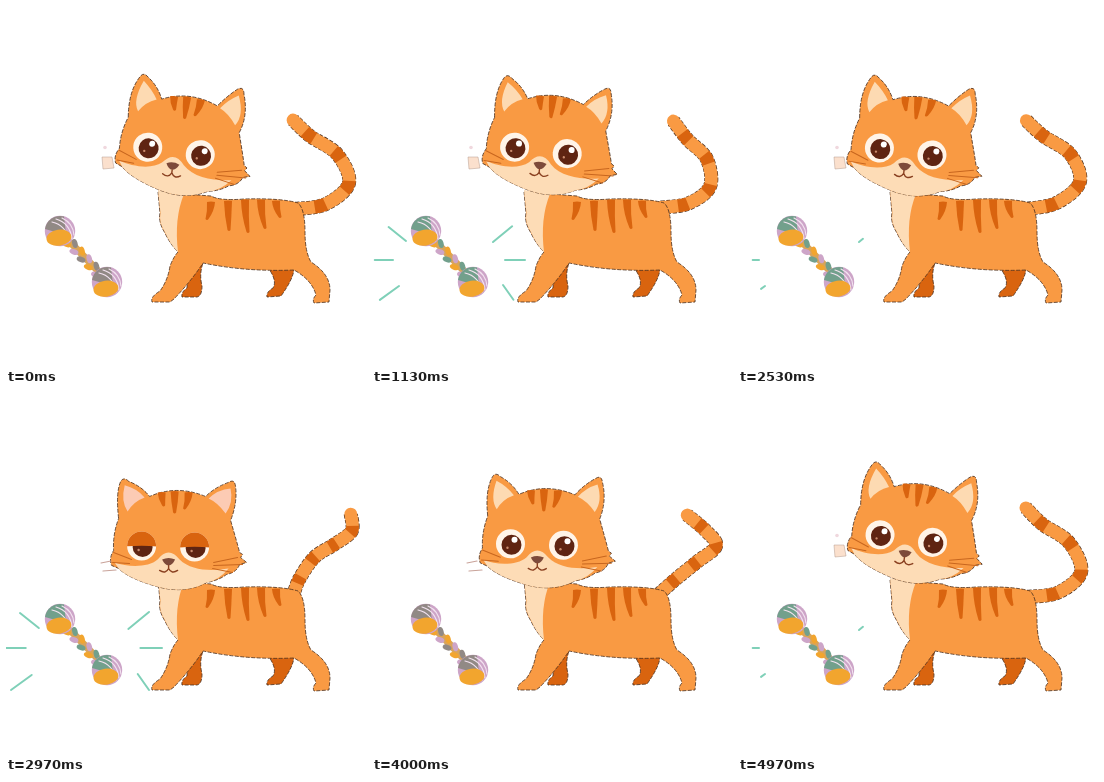
An HTML page for the animation above (5000 ms loop, 360 by 360 pixels).

```html
<!DOCTYPE html>
<html lang="en">
<head>
<meta charset="utf-8">
<title>Cat and rope toy</title>
<style>
  html, body { margin: 0; width: 100%; height: 100%; overflow: hidden; background: #fff; }
  svg { display: block; width: 100vw; height: 100vh; }
  .fur { fill: #f99a43; }
  .dark { fill: #d9640f; }
  .cream { fill: #fddcb6; }
  .edge { stroke: #4a2f1f; stroke-width: .8; stroke-dasharray: 4 1.5; }
  .line { fill: none; stroke-linecap: round; stroke-linejoin: round; }
  .whisker { stroke: #c8661e; stroke-width: 1; }
</style>
</head>
<body>
<svg viewBox="0 0 360 360">
  <defs>
    <clipPath id="eyeClip"><circle r="14.5"/></clipPath>
    <g id="eye">
      <circle r="14.5" fill="#fff4e8"/>
      <circle cx="1" cy="1" r="10" fill="#5f2412"/>
      <circle cx="4" cy="-4" r="3" fill="#fff"/>
      <circle cx="-3" cy="4" r="1.2" fill="#c98a6c"/>
    </g>
    <g id="ball">
      <circle r="15.2" fill="#cda5c8"/>
      <path class="strand" d="M-15 -2 A15.2 15.2 0 0 1 4 -14.5 L6 2 L-8 0 Z"/>
      <path class="line" d="M-4 -12 Q10 -8 12 8 M2 -13 Q13 -8 14 4 M-8 -9 Q6 -6 9 10" stroke="#f3e3f0" stroke-width="1.2"/>
      <ellipse cx="-2" cy="6.5" rx="12.5" ry="8" fill="#f2a52e" transform="rotate(-8)"/>
    </g>
  </defs>

  <g id="burst" class="line" stroke="#7fd0b8" stroke-width="2"></g>

  <g id="rope"></g>
  <use href="#ball" x="54" y="225"/>
  <use href="#ball" x="101" y="276"/>

  <g class="line">
    <path class="tail" stroke="#4a2f1f" stroke-width="14" stroke-dasharray="4 1.5" style="stroke-linecap:butt"/>
    <path class="tail" stroke="#f99a43" stroke-width="12.8"/>
    <path class="tail" pathLength="148" stroke="#d9640f" stroke-width="12.8"
      stroke-dasharray="0 18.5 11 23 11 23 11 23 11 100" style="stroke-linecap:butt"/>
  </g>

  <path class="dark edge" d="M260 259 L288 262 Q288 272 275 290 L261 291 Q260 286 267 282 Q272 274 260 259 Z"/>
  <path class="dark edge" d="M182 262 L197 257 Q193 268 196 280 Q196 290 191 291 L176 291 Q175 286 181 282 Z"/>
  <path class="fur edge" d="M152 186 L205 190 Q214 195 238 193 Q276 192 292 197 Q299 203 299 226 Q299 246 305 256
    Q324 268 324 284 L323 296 L308 297 Q306 293 310 289 Q306 274 288 264 Q240 266 197 257 Q186 274 168 293 L164 296
    L146 296 Q144 291 154 285 Q162 274 164 260 Q168 250 172 246 Q164 238 159 227 Q152 216 154 207 Z"/>
  <path class="cream" d="M152 184 L178 188 Q168 212 172 246 Q164 238 159.500 227 Q152.500 216 154.500 207 Z"/>
  <g id="coat" class="dark"></g>

  <g id="head">
    <path id="skull" class="fur edge"/>
    <path class="cream" d="M108 168 C122 173 142 173 151 165 Q162 151 173 165 C184 176 204 177 222 174
      Q212 186 200 188 Q178 200 150 192 Q122 184 112 174 Z"/>
    <path id="earL" class="ear"/>
    <path id="earR" class="ear"/>
    <g id="brow" class="dark"></g>
    <path class="line whisker" d="M207 168 L231 163 M207 171 L236 170 M206 174 L226 178 M107 158 L125 165 M106 168 L123 169"/>
    <g transform="translate(135 151.500)"><use href="#eye"/><g clip-path="url(#eyeClip)"><path class="lid dark"/></g></g>
    <g transform="translate(188 152.500)"><use href="#eye"/><g clip-path="url(#eyeClip)"><path class="lid dark"/></g></g>
    <path d="M155.500 165 Q162 162 168.500 165 Q166 170.500 162 171 Q158 170.500 155.500 165 Z" fill="#7d4a3a"/>
    <path class="line" d="M162 171 V174 Q159 180 153 176 M162 174 Q165 180 171 176" stroke="#8a4020" stroke-width="1.4"/>
  </g>

  <g id="square"><path d="M96 151 H106 L108 162 L97 163 Z" fill="#fbe0cd" stroke="#b59a8c" stroke-width=".5"/>
    <circle cx="99" cy="141.500" r="1.800" fill="#f0d8de"/></g>
  <g id="blobs" fill="#f2e2dc" stroke="#8b7d78" stroke-width=".6">
    <ellipse cx="99" cy="143" rx="3" ry="1.800"/><ellipse cx="100" cy="152" rx="3.500" ry="2"/><ellipse cx="99" cy="160" rx="3" ry="2"/></g>
  <path id="wisps" class="line" d="M95 169 L105 167 M97 177 L110 176" stroke="#c9a39a" stroke-width="1.200"/>
</svg>
<script>
const $ = id => document.getElementById(id);
const all = sel => document.querySelectorAll(sel);
const LOOP = 5000, CAT = 1250, STEP = 100, STEPS = 8;

// Key times as a fraction of the cat's cycle
const TIMES = [0, .2, .384, .424, .56, .72, .88];
// x shift, y shift, tilt, ear perk, eye opening
const HEAD = [
  [6.5, -7, 7, 5, 1],
  [3.5, -1.5, .5, 2.5, 1],
  [.5, .5, 0, 0, .45],
  [0, 0, 0, 0, 0],
  [2, -1.5, 0, 0, .25],
  [7, -6.5, 3.5, 1, .9],
  [7.5, -7.5, 5.5, 3, 1]
];
// Six centre points, base to tip
const TAIL = [
  [290, 203, 320, 198, 343, 177, 331, 148, 304, 130, 287, 114],
  [287, 200, 304, 185, 325, 168, 344, 152, 334, 137, 315, 121],
  [287, 202, 293, 185, 308, 163, 328, 150, 346, 137, 346, 120],
  [287, 202, 293, 185, 307, 162, 327, 145, 346, 133, 353, 120],
  [287, 200, 301, 187, 317, 170, 330, 152, 344, 137, 353, 121],
  [287, 199, 308, 194, 323, 182, 329, 163, 330, 143, 330, 127],
  [289, 201, 315, 197, 336, 181, 335, 154, 319, 135, 306, 116]
];

// Smooth cyclic interpolation through the rows
function sample(rows, p) {
  const n = TIMES.length;
  const time = k => TIMES[(k + n) % n] + Math.floor(k / n);
  const row = k => rows[(k + n) % n];
  let i = n - 1;
  while (TIMES[i] > p) i--;
  const t0 = time(i), t1 = time(i + 1), h = t1 - t0, u = (p - t0) / h;
  const slope = (k, j) => (row(k + 1)[j] - row(k - 1)[j]) / (time(k + 1) - time(k - 1));
  return row(i).map((a, j) => {
    const b = row(i + 1)[j], v = 1 - u;
    return a * (1 + 2 * u) * v * v + b * u * u * (3 - 2 * u)
      + h * u * v * (slope(i, j) * v - slope(i + 1, j) * u);
  });
}

function curve(c) {
  const n = c.length / 2;
  const pt = i => { const k = 2 * Math.min(n - 1, Math.max(0, i)); return [c[k], c[k + 1]]; };
  let d = `M${pt(0)}`;
  for (let i = 0; i < n - 1; i++) {
    const [a, b, e, f] = [pt(i - 1), pt(i), pt(i + 1), pt(i + 2)];
    d += `C${b.map((v, k) => v + (e[k] - a[k]) / 6)} ${e.map((v, k) => v - (f[k] - b[k]) / 6)} ${e}`;
  }
  return d;
}

const wedge = ([x, y, tx, ty], w) =>
  `<path d="M${x - w} ${y} Q${x} ${y - 1} ${x + w} ${y} Q${x + w - .5} ${(y + ty) / 2} ${tx + 1.5} ${ty} Q${tx} ${ty + 2} ${tx - 1.5} ${ty} Q${x - w + .5} ${(y + ty) / 2} ${x - w} ${y} Z"/>`;

$('coat').innerHTML = [[205, 196, 201, 213], [222, 195, 223, 224], [239, 194, 242, 226],
  [255, 194, 259, 222], [270, 195, 274, 211]].map(s => wedge(s, 4)).join('');
$('brow').innerHTML = [[155, 98, 157, 111], [168, 97, 168, 118], [182, 98, 178, 114]]
  .map(s => wedge(s, 4)).join('');

// Braided rope
const braid = ['fill="#f2a52e"', 'class="strand"', 'fill="#cda5c8"'];
let rope = '<path d="M63 235 L93 266" stroke="#d9a45a" stroke-width="7"/>';
for (let i = 0; i < 9; i++) {
  const side = i % 2 ? 2.3 : -2.3, x = 63 + i * 3.6 + side, y = 236 + i * 3.8 - side;
  rope += `<ellipse ${braid[i % 3]} rx="4.6" ry="2.7" transform="translate(${x} ${y}) rotate(${i % 2 ? 75 : 20})"/>`;
}
$('rope').innerHTML = rope;

// Inner and outer ends; the first three start earliest
const RAYS = [[21, 254, 0, 254], [27, 280, 5, 296], [121, 236, 143, 218],
  [34, 235, 14, 219], [133, 254, 156, 254], [131, 279, 143, 296]];
const REACH = [0, .3, .66, .87, 1, 1, 1, 1];
const TRAIL = [0, 0, 0, 0, 0, .06, .4, .75];

function drawToy(t) {
  const k = Math.floor(t / STEP) % STEPS;
  const from = TRAIL[k], to = REACH[k];
  $('burst').innerHTML = RAYS.map(([x, y, ox, oy], i) => {
    if (!to || (k === 1 && i > 2)) return '';
    const end = k === 1 && i ? to * .6 : to;
    const at = f => `${x + (ox - x) * f} ${y + (oy - y) * f}`;
    return `<path d="M${at(from)} L${at(end)}"/>`;
  }).join('');
  all('.strand').forEach(s => s.setAttribute('fill', to ? '#72a08c' : '#918985'));
}

function drawHead(p) {
  const [dx, dy, tilt, e, eye] = sample(HEAD, p);
  const lx = 117 + e, ly = 85 - e, rx = 226 - e, ry = 87 - e;
  $('head').setAttribute('transform', `translate(${dx} ${dy}) rotate(${tilt} 162 152)`);
  $('skull').setAttribute('d', `M112 124 Q109 98 ${lx - 3} ${ly + 2} Q${lx} ${ly - 3} ${lx + 5} ${ly + 2}
    Q${135 + e / 2} ${92 - e / 2} 143 102 Q170 90 199 102 Q208 ${93 - e / 2} ${rx - 4} ${ry + 1}
    Q${rx + 2} ${ry - 3} ${rx + 3} ${ry + 5} Q231 108 224 126 C228 140 231 150 233 158 L236 160 L234 163 L240 168 L233 170
    Q230 178 220 180 Q212 186 200 188 Q178 200 150 192 Q122 184 112 174 L105 171 Q102 164 107 156 Q106 140 112 124 Z`);
  $('earL').setAttribute('d', `M${lx + 1} ${ly + 6} Q114 107 121 117 Q127 107 138 103 Q${130 + e / 2} 94 ${lx + 1} ${ly + 6} Z`);
  $('earR').setAttribute('d', `M${rx - 2} ${ry + 7} Q227 108 219 119 Q211 108 202 104 Q${211 - e / 2} 95 ${rx - 2} ${ry + 7} Z`);
  const pink = p > .3 && p < .62;
  all('.ear').forEach(s => s.setAttribute('fill', pink ? '#fccbb4' : '#fddab2'));
  const low = 15 - 30 * Math.min(1, Math.max(0, eye));
  all('.lid').forEach(s => s.setAttribute('d', `M-16 -16 H16 V${-low * -1} Q0 ${low - 1.5} -16 ${low} Z`));
}

function show(id, on) { $(id).style.display = on ? '' : 'none'; }

function drawCat(t) {
  const p = (t % CAT) / CAT;
  drawHead(p);
  const d = curve(sample(TAIL, p));
  all('.tail').forEach(s => s.setAttribute('d', d));
  show('square', p < .1 || p > .85);
  show('blobs', p > .64 && p <= .85);
  show('wisps', p >= .1 && p <= .64);
}

function frame(now) {
  const t = now % LOOP;
  drawToy(t);
  drawCat(t);
  requestAnimationFrame(frame);
}
frame(0);
</script>
</body>
</html>
```
